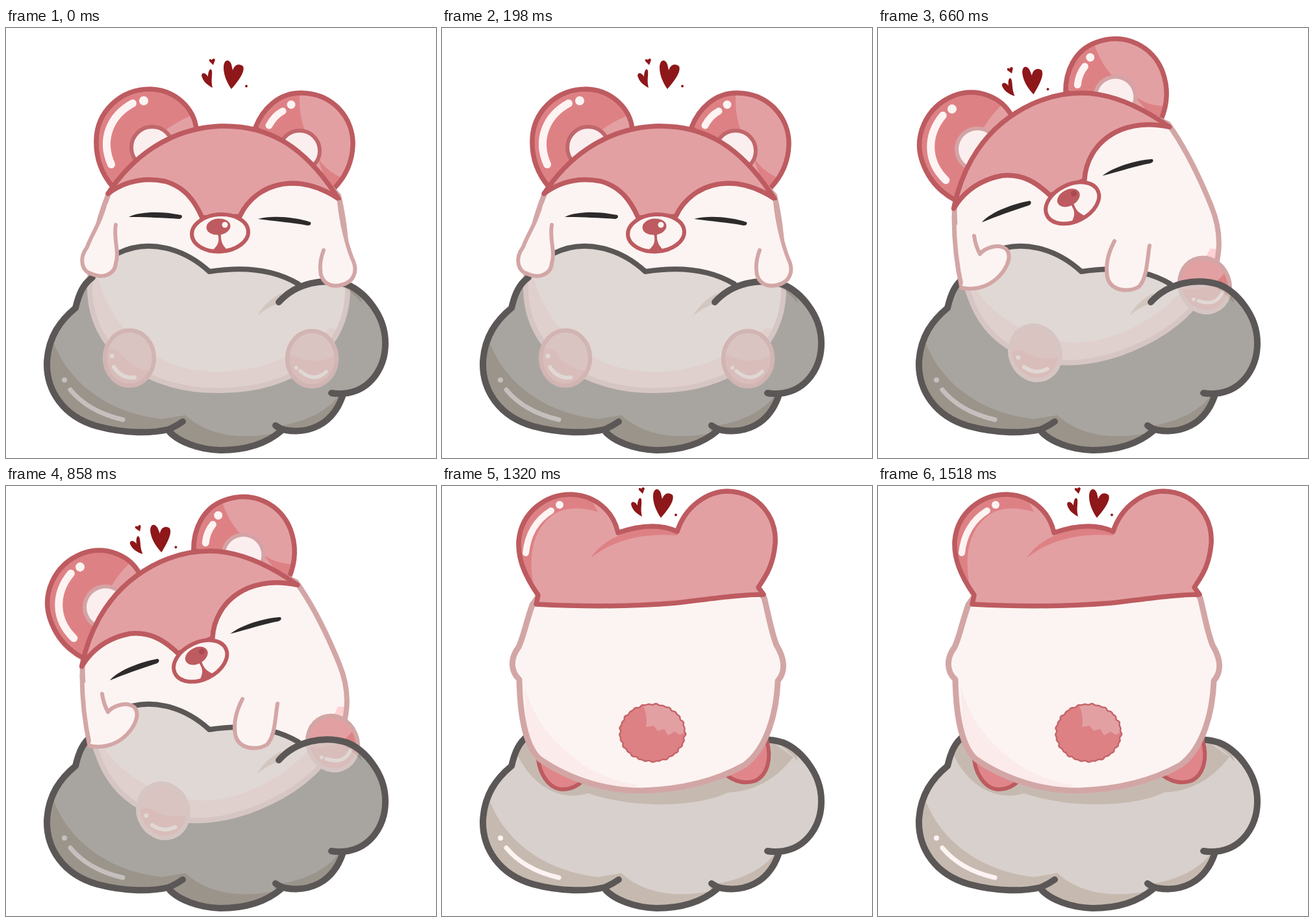
An HTML page for the animation above (1.65 s loop, 662 by 662 pixels).

```html
<!DOCTYPE html>
<html lang="en">
<head>
<meta charset="utf-8">
<title>Bear on a cloud</title>
<style>
  html, body { margin: 0; width: 100%; height: 100%; overflow: hidden; background: #fff; }
  svg { display: block; width: 100vw; height: 100vh; }
  path, ellipse, circle { stroke-linecap: round; stroke-linejoin: round; }
  .line { fill: none; }
  .red { stroke: #bd5b60; stroke-width: 7.5; }
  .edge { stroke: #d3a6a6; stroke-width: 7; }
  .white { fill: #fcf4f2; }
  .pink { fill: #e3a0a3; }
  .rose { fill: #de8185; }
  .shine { fill: none; stroke: #fdf3f2; }
  .heart { fill: #8e1719; }
  .shade { fill: #c6bab0; }
  .ink { fill: #2d2a2b; }
  .sole { fill: none; stroke: var(--sole); stroke-width: 6.5; }
  .inner { fill: #fbeeee; stroke: var(--inner); stroke-width: 6; }
  .belly { fill: var(--belly); }
  .dot { fill: var(--dot); }
</style>
</head>
<body>
<svg viewBox="0 0 662 662">
  <defs>
    <path id="puff" d="M133 384C118 395 112 410 107 431C84 450 65 475 63 515C62 558 88 598 140 613C185 625 225 624 250 620C265 636 295 649 330 650C370 650 402 639 424 620C455 627 500 613 518 566C560 562 584 525 584 485C584 440 550 405 525 395C500 386 470 388 450 394C420 373 370 368 313 376C280 337 220 323 172 347Z"/>
    <path id="earL" d="M164 244C148 225 138 200 139 172C140 130 175 94 222 94C262 95 290 125 293 156L230 200Z"/>
    <path id="earR" d="M384 153C395 125 420 99 455 100C505 101 535 140 534 180C533 210 520 232 504 248L430 200Z"/>
    <path id="body" d="M158 255C140 300 129 350 129 400C129 500 220 560 330 558C440 558 527 500 526 400C526 350 522 300 512 258C460 200 400 168 330 168C260 168 200 200 158 255Z"/>
    <ellipse id="foot" rx="38" ry="42.5"/>
    <path id="scalp" d="M145 182L148 168C125 135 117 110 118 85C122 40 160 12 200 13C238 15 264 40 271 72Q325 53 362 70C375 30 410 8 440 8C490 10 515 50 513 88C510 125 496 142 487 156L495 167C460 167 420 173 360 180C300 185 220 186 145 182Z"/>
    <path id="back" d="M139 183C128 215 126 230 118 248C105 265 105 285 119 298C120 350 128 400 150 420C200 455 260 470 310 469C370 467 420 455 465 430C500 405 515 350 517 300C530 285 527 265 515 245C507 225 503 200 496 172L470 140H170Z"/>
    <path id="tail"/>

    <clipPath id="inPuff"><use href="#puff"/></clipPath>
    <clipPath id="inEarL"><use href="#earL"/></clipPath>
    <clipPath id="inEarR"><use href="#earR"/></clipPath>
    <clipPath id="inBody"><use href="#body"/></clipPath>
    <clipPath id="inFoot"><use href="#foot"/></clipPath>
    <clipPath id="inScalp"><use href="#scalp"/></clipPath>
    <clipPath id="inBack"><use href="#back"/></clipPath>
    <clipPath id="inTail"><use href="#tail"/></clipPath>

    <g id="cloudFill">
      <use href="#puff" fill="#d8d0cc"/>
      <g clip-path="url(#inPuff)" class="shade">
        <path d="M74 486C95 540 150 592 240 602L276 596C305 622 350 638 424 622L420 662H40V486Z"/>
        <path d="M412 614C460 608 495 590 514 564L530 580L480 640H420Z"/>
        <path d="M387 443C395 428 408 416 424 408L420 424Q402 430 387 443Z"/>
        <path d="M505 392Q528 400 548 424Q545 400 520 390Z"/>
      </g>
      <path class="shine" d="M99 557C118 580 145 595 180 603" stroke-width="7"/>
      <circle cx="90" cy="542" r="4" class="white"/>
    </g>
    <g id="cloudLine" class="line" stroke="#5b5756" stroke-width="10">
      <path d="M133 384C118 395 112 410 107 431C84 450 65 475 63 515C62 558 88 598 140 613C185 625 225 624 250 618Q262 613 272 606"/>
      <path d="M252 622C265 636 295 649 330 650C370 650 402 639 424 620M415 612Q422 617 430 619C465 625 502 612 518 567M501 562Q512 564 526 562C560 556 584 525 584 485C584 440 550 405 525 395C490 384 447 392 420 422"/>
      <path stroke-width="8" d="M172 347C220 323 275 340 313 375C370 366 415 373 450 394"/>
    </g>
  </defs>

  <use href="#puff" fill="#0c1610" data-on="012"/>
  <g data-on="34">
    <use href="#cloudFill"/>
    <path class="shade" clip-path="url(#inPuff)" d="M112 405C135 460 180 487 225 473C290 496 390 496 440 472C490 470 522 442 541 417L500 388H130Z"/>
    <use href="#cloudLine"/>
  </g>

  <g id="bear" data-on="0123">
    <use href="#earL" class="rose"/>
    <path clip-path="url(#inEarL)" class="pink" d="M292 132C268 142 250 152 236 166L300 190Z"/>
    <use href="#earL" class="line red"/>
    <use href="#earR" class="pink"/>
    <path clip-path="url(#inEarR)" class="rose" d="M453 95Q449 130 461 160L400 200H370V95ZM480 200Q495 222 520 232L500 260Z"/>
    <use href="#earR" class="line red"/>
    <circle cx="225" cy="184" r="32" class="inner"/>
    <circle cx="452" cy="189" r="31" class="inner"/>
    <path class="shine" d="M195 116C160 135 145 172 162 210" stroke-width="12"/>
    <path class="shine" d="M426 128Q413 135 405 150" stroke-width="11"/>
    <circle cx="212" cy="112" r="7" class="white"/>
    <circle cx="439" cy="118" r="6.5" class="white"/>

    <use href="#body" class="white"/>
    <path class="belly" clip-path="url(#inBody)" d="M142 385C155 440 200 495 255 517C330 545 430 525 500 460L540 480L480 570H200L110 480V385Z"/>
    <use href="#body" class="line edge" style="stroke-width:8"/>

    <g transform="translate(190 508)">
      <use href="#foot" class="rose"/>
      <path clip-path="url(#inFoot)" class="pink" d="M-45 -50H50V20Q8 24 -16 -10Q-28 -20 -45 -10Z"/>
      <use href="#foot" class="sole"/>
      <path class="shine" d="M-24 14Q-12 32 8 30" stroke-width="6"/>
      <circle cx="-27" cy="-3" r="3.5" class="white"/>
    </g>
    <g transform="translate(471 509)">
      <use href="#foot" class="rose"/>
      <path clip-path="url(#inFoot)" class="pink" d="M-45 -50H50V-18Q28 6 -4 3Q-24 0 -45 -14Z"/>
      <use href="#foot" class="sole"/>
      <path class="shine" d="M-18 19Q4 38 22 20" stroke-width="5.5"/>
      <circle cx="-24" cy="14" r="3" class="white"/>
    </g>

    <path class="pink red" d="M157 255C190 205 245 155 330 151C405 149 460 182 512 263C490 248 465 239 440 239C395 240 370 268 360 290L302 292C290 265 275 245 245 236C215 230 185 234 157 255Z"/>
    <path class="ink" d="M189 291C210 281 245 283 270 288Q273 292 267 294C240 292 212 291 189 291Z"/>
    <path class="ink" d="M388 294C410 288 445 291 469 299Q471 304 464 304C440 299 415 298 388 294Z"/>

    <ellipse cx="329.5" cy="315.5" rx="43.5" ry="28.5" class="white red" style="stroke-width:6" transform="rotate(-4 330 315)"/>
    <g fill="#bd5b60">
      <ellipse cx="327" cy="306" rx="18.5" ry="12.5" transform="rotate(-6 327 306)"/>
      <path d="M326 316H331C330 329 334 335 341 342Q330 345 319 341C327 334 329 328 326 316Z"/>
    </g>
    <circle class="dot" cx="337" cy="303" r="4.5"/>
  </g>

  <g data-on="012">
    <use href="#cloudFill" opacity=".77"/>
    <use href="#cloudLine"/>
  </g>

  <g id="arms" class="white edge" style="stroke-width:6" data-on="013">
    <path d="M154 266C146 300 132 317 125 337C111 356 117 375 133 379C150 387 168 378 169 362C175 345 165 325 169 303"/>
    <path d="M513 268C516 300 525 335 533 355C543 375 535 392 515 396C495 400 484 388 484 372C483 360 486 350 489 342"/>
  </g>
  <g data-on="2">
    <path class="white" d="M148 318L157 348L198 340L180 388L130 400C121 370 117 330 117 300Z"/>
    <path class="line edge" d="M117 290C117 330 121 365 129 400"/>
    <g class="white edge" style="stroke-width:6">
      <path d="M148 320Q150 335 157 348C165 338 186 331 198 341C208 354 195 376 180 388C165 400 145 404 129 400"/>
      <path d="M364 328C355 345 350 365 353 383C358 405 385 408 402 398C414 385 414 360 418 335"/>
    </g>
  </g>

  <g data-on="4">
    <g fill="#e0868a" class="red" style="stroke-width:6">
      <path d="M148 405C145 440 165 468 187 467Q206 466 218 452L190 400Z"/>
      <path d="M500 392C508 420 501 445 482 454Q460 461 439 446L460 400Z"/>
    </g>
    <use href="#back" class="white"/>
    <path clip-path="url(#inBack)" fill="#fbebeb" d="M128 310C140 355 165 390 205 420Q240 450 300 460L280 480L130 420Z"/>
    <use href="#back" class="line edge" style="stroke-width:9"/>
    <use href="#scalp" class="pink"/>
    <g clip-path="url(#inScalp)" class="rose">
      <path d="M142 160C132 110 138 65 175 42Q200 28 240 40L220 0H100V170Z"/>
      <path d="M229 111C250 76 310 56 368 66L362 76C310 72 265 82 229 111Z"/>
    </g>
    <use href="#scalp" class="line red"/>
    <path class="shine" d="M168 38C144 53 132 75 129 103" stroke-width="10"/>
    <circle cx="181" cy="29" r="6" class="white"/>
    <use href="#tail" class="rose"/>
    <path clip-path="url(#inTail)" class="pink" d="M306 330Q318 352 314 371L326 369L332 377L342 374L348 384L358 378L366 383L382 374V325Z"/>
    <use href="#tail" class="line" stroke="#c4666a" stroke-width="2.5"/>
  </g>

  <g id="heartsA" class="heart" data-on="024">
    <path d="M347 94C340 84 335 72 335 61C335 49 343 46 347 56L349 65C352 56 359 54 365 59C368 66 361 78 347 94Z"/>
    <path d="M318 92C310 88 303 82 301 73C302 67 308 69 311 75C311 66 315 60 317 66C318 74 315 80 318 92Z"/>
    <path d="M319 57L313 51Q312 46 317 49Q320 45 322 49Z"/>
    <circle cx="370" cy="89.5" r="2"/>
  </g>
  <g id="heartsB" class="heart" data-on="13">
    <path d="M322 81C305 78 290 66 287 50C287 41 293 39 295 48C296 41 301 41 302 47C299 58 305 71 322 81Z"/>
    <path d="M312 56L307 50Q307 45 311 48Q315 45 316 50Z"/>
    <path d="M334 73C328 63 319 52 319 42C319 37 324 37 327 42C329 35 334 33 335 40C336 50 332 60 334 73Z"/>
    <path d="M347 78C342 74 339 68 341 64Q344 61 346 66Q350 61 352 64C353 70 351 75 347 78Z"/>
    <path d="M367 79C358 68 356 52 360 43C364 36 371 37 372 47C377 40 386 41 389 48C390 58 378 70 367 79Z"/>
    <path d="M291 37L287 34Q288 32 291 33L294 33Z"/>
    <path d="M349 39L354 35L352 39Z"/>
  </g>
</svg>
<script>
const STEP = 330;
const hop = 'translate(-13 -90)';
const tilt = 'translate(197 282) rotate(-22) translate(-230 -289)';
const sit = { inner: '#c0676b', belly: '#ffd0d4', dot: '#fcf4f2', sole: '#bd5b60' };
const poses = [
  { colors: sit },
  { colors: sit },
  { bear: tilt, heartsA: 'translate(239 80) rotate(-9) translate(-350 -72)',
    colors: { ...sit, inner: '#d4a3a5', dot: '#a84a50', sole: '#d3a6a6' } },
  { bear: hop, arms: hop, heartsB: 'translate(-11 -29)',
    colors: { ...sit, inner: '#d4a3a5', belly: '#fbeeed' } },
  { heartsA: 'translate(-10 -45)', colors: sit }
];
const $ = id => document.getElementById(id);
const parts = [...document.querySelectorAll('[data-on]')];

// fluffy tail outline
const rim = Array.from({ length: 120 }, (_, i) => {
  const a = i * Math.PI / 60;
  const k = 1 + 0.018 * Math.sin(a * 29) + 0.012 * Math.sin(a * 17 + 1);
  return `${(324 + 50 * k * Math.cos(a)).toFixed(1)} ${(380 + 44 * k * Math.sin(a)).toFixed(1)}`;
});
$('tail').setAttribute('d', `M${rim.join('L')}Z`);

let shown = -1;
function show(n) {
  if (n === shown) return;
  shown = n;
  const pose = poses[n];
  for (const el of parts) el.style.display = el.dataset.on.includes(n) ? '' : 'none';
  for (const id of ['bear', 'arms', 'heartsA', 'heartsB']) $(id).setAttribute('transform', pose[id] || '');
  for (const name in pose.colors) $('bear').style.setProperty('--' + name, pose.colors[name]);
}

const start = performance.now();
function tick() {
  show(Math.floor((performance.now() - start) / STEP) % poses.length);
  requestAnimationFrame(tick);
}
tick();
</script>
</body>
</html>
```
